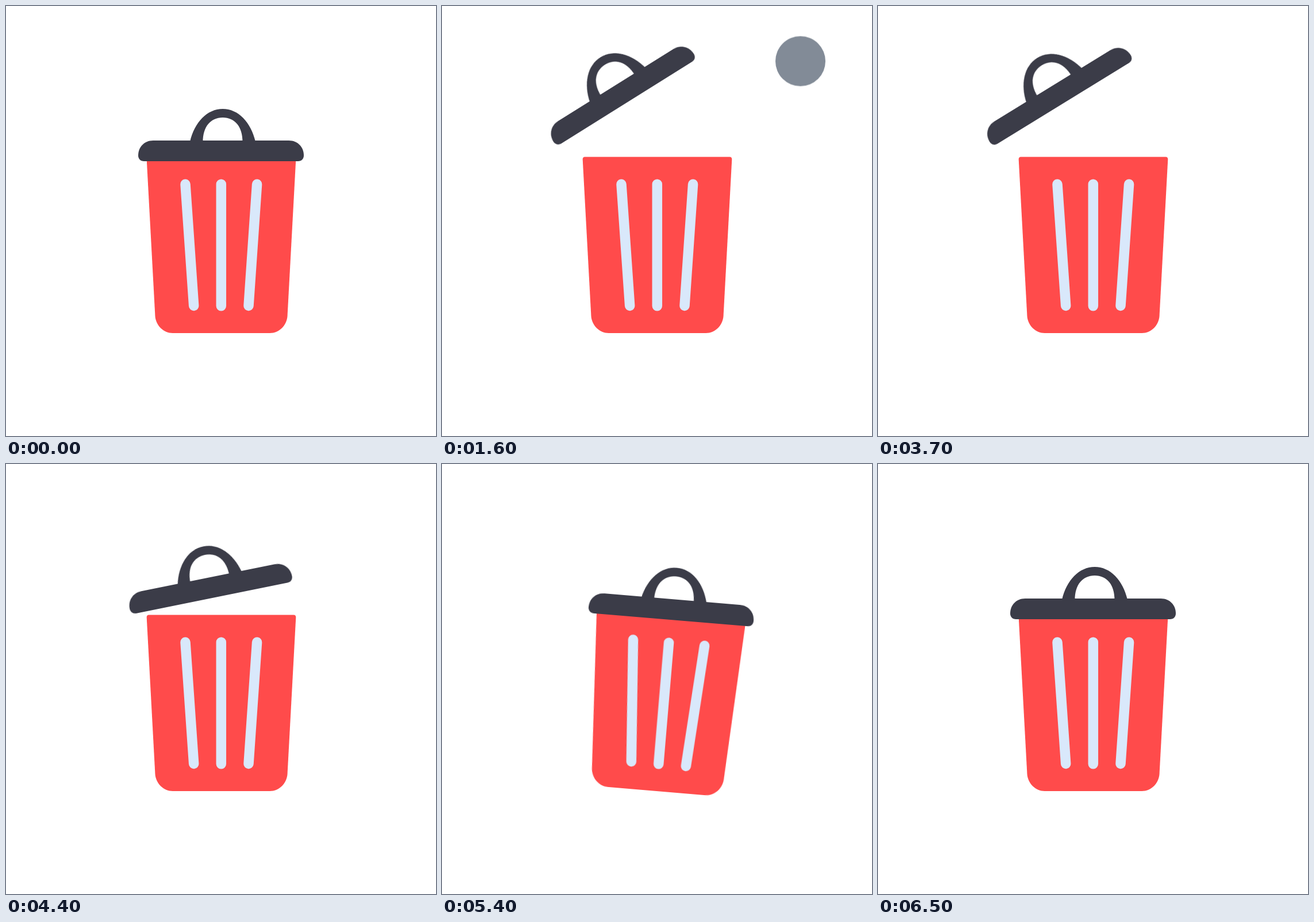
An HTML page that plays this animation: 748x748 px, repeating every 6600 ms.

```html
<!DOCTYPE html>
<html lang="en">
<head>
<meta charset="utf-8">
<title>Trash bin</title>
<style>
  html, body { margin: 0; width: 100%; height: 100%; overflow: hidden; background: #fff; }
  .stage { position: relative; width: 748px; height: 748px; overflow: hidden; --now: 0; }
  svg { position: absolute; inset: 0; }

  /* Paused animations, scrubbed through --now in 100 ms steps */
  .rock, .lid, .ball {
    animation-duration: 6600ms;
    animation-iteration-count: infinite;
    animation-play-state: paused;
    animation-delay: calc(var(--now) * -1ms);
  }

  .ball {
    position: absolute; left: 0; top: 0; width: 87px; height: 87px;
    border-radius: 50%; background: #828b97;
    offset-path: path("M623.5 96 C545 106 415 160 374 340");
    offset-rotate: 0deg;
    animation-name: show, bounce, toss;
  }
  .lid { transform-origin: 285px 261px; animation-name: lid; }
  .rock { transform-origin: 374px 551px; animation-name: rock; }

  @keyframes lid {
    0% { transform: translate(0, 0) rotate(0deg); animation-timing-function: cubic-bezier(.46, 0, .69, 1); }
    24.24%, 54.54% { transform: translate(-44px, -53.4px) rotate(-32deg); animation-timing-function: cubic-bezier(.28, 0, .35, 1); }
    81.82%, 100% { transform: translate(0, 0) rotate(0deg); }
  }
  @keyframes show {
    0%, 15.14% { opacity: 0; }
    15.15%, 54.54% { opacity: 1; }
    54.55%, 100% { opacity: 0; }
  }
  @keyframes bounce {
    0%, 15.15% { translate: 0 0; animation-timing-function: ease-in; }
    21.21% { translate: 0 411.5px; animation-timing-function: ease-out; }
    24.24%, 100% { translate: 0 0; }
  }
  @keyframes toss {
    0%, 24.24% { offset-distance: 0%; animation-timing-function: cubic-bezier(.37, 0, .63, 1); }
    54.54%, 100% { offset-distance: 100%; }
  }
  @keyframes rock {
    0%, 70.61% { transform: rotate(0deg); animation-timing-function: cubic-bezier(.37, 0, .63, 1); }
    80.91% { transform: rotate(4.95deg); animation-timing-function: cubic-bezier(.37, 0, .63, 1); }
    93.03% { transform: rotate(-4deg); animation-timing-function: ease-in; }
    98.47% { transform: rotate(-1.6deg); }
    98.48%, 100% { transform: rotate(0deg); }
  }
</style>
</head>
<body>
<div class="stage">
  <div class="ball"></div>
  <svg width="748" height="748" viewBox="0 0 748 748">
    <g class="rock">
      <path fill="#ff4b4b" d="M248.5 262.5 H500.5 Q504.5 262.5 504.3 267 L489.5 540 C488 556 475 569 459 569 H290 C274 569 261 556 259.5 540 L244.7 267 Q244.5 262.5 248.5 262.5 Z"/>
      <path fill="none" stroke="#d9e8fb" stroke-width="17.5" stroke-linecap="round" d="M312 310 L326.7 521.5 M374.3 310 V521.7 M436.6 310 L422 521.5"/>
      <g class="lid" fill="#3b3c48">
        <path d="M230 260 C230 245 241 234 256 234 H492 C507 234 518 245 518 260 C518 266 514 270 508 270 H240 C234 270 230 266 230 260 Z"/>
        <path d="M320 236 C328 202 350 179 377 179 C404 179 426 202 434 236 H411.5 C411.5 210 398 194 377 194 C356 194 342.5 210 342.5 236 Z"/>
      </g>
    </g>
  </svg>
</div>
<script>
  const LOOP = 6600, STEP = 100;
  const stage = document.querySelector('.stage');
  function tick() {
    const time = performance.now() % LOOP;
    stage.style.setProperty('--now', Math.floor(time / STEP) * STEP);
    requestAnimationFrame(tick);
  }
  tick();
</script>
</body>
</html>
```
